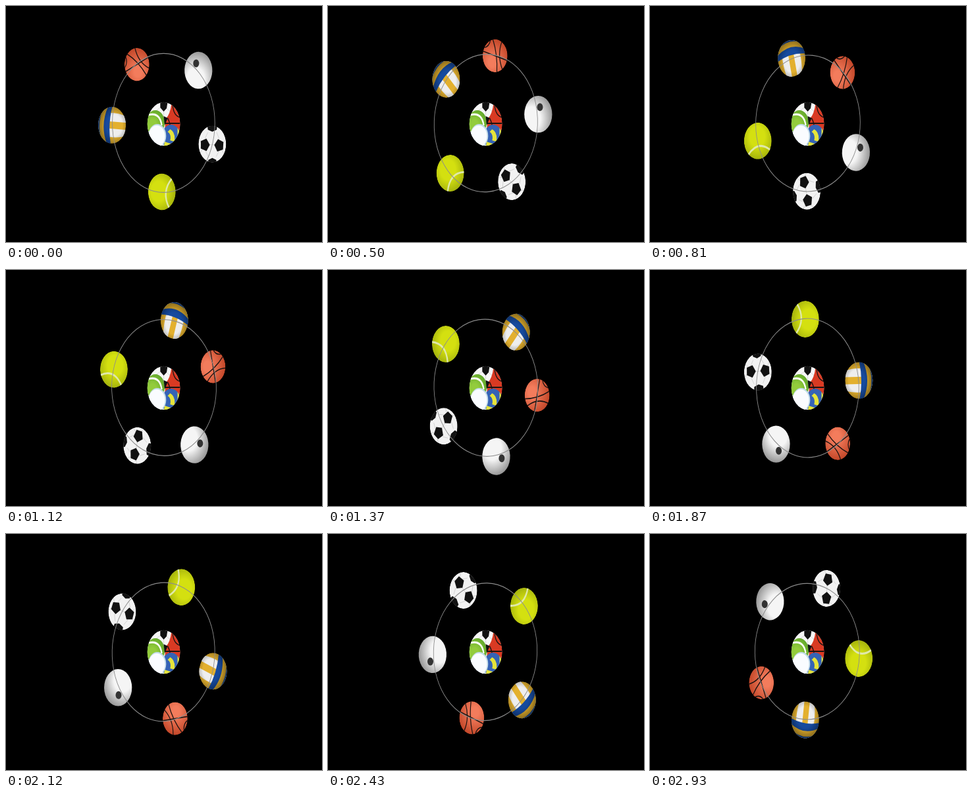
Write an HTML page that moves like this. It is 480 px wide and 360 px high and loops after 3000 ms.

```html
<!DOCTYPE html>
<html lang="en">
<head>
<meta charset="utf-8">
<title>Wheel of balls</title>
<style>
  html, body { margin: 0; width: 100%; height: 100%; overflow: hidden; background: #000; }
  svg { display: block; width: 480px; height: 360px; }
  .line { fill: none; stroke: #1c1412; stroke-width: 1.8; }
  .seam { fill: none; stroke: #c4c4c4; stroke-width: .7; }
  .ink { fill: #111; }
  .blue { fill: #164a9e; }
  .gold { fill: #e3b02e; }
</style>
</head>
<body>
<svg viewBox="0 0 480 360">
  <defs>
    <clipPath id="ball"><circle r="28"/></clipPath>
    <clipPath id="disc"><circle r="33.2"/></clipPath>
    <radialGradient id="shade" cx=".5" cy=".42" r=".58">
      <stop offset=".5" stop-opacity="0"/>
      <stop offset="1" stop-opacity=".4"/>
    </radialGradient>
    <radialGradient id="pearl" cx=".26" cy=".62" r=".8">
      <stop offset=".4" stop-color="#f5f5f5"/>
      <stop offset="1" stop-color="#8e8e8e"/>
    </radialGradient>
    <radialGradient id="felt" cx=".38" cy=".5" r=".68">
      <stop offset=".4" stop-color="#d4e010"/>
      <stop offset="1" stop-color="#9cab0c"/>
    </radialGradient>
    <radialGradient id="leather" cx=".3" cy=".4" r=".75">
      <stop offset=".2" stop-color="#f37c5c"/>
      <stop offset="1" stop-color="#c04426"/>
    </radialGradient>
    <radialGradient id="grass" cx=".35" cy=".6" r=".7">
      <stop offset=".3" stop-color="#93cc3c"/>
      <stop offset="1" stop-color="#5fa62a"/>
    </radialGradient>
    <path id="pent" class="ink" d="M0 -10L9.5 -3L6 8L-6 8L-9.5 -3Z"/>
  </defs>

  <g transform="translate(239.4 179.2) scale(.75 1)">
    <g id="wheel">
      <!-- white ball -->
      <g transform="rotate(-49) translate(107.5) rotate(7.5)">
        <circle r="28.2" fill="url(#pearl)"/>
        <circle cx="3.5" cy="-11" r="6" fill="#333"/>
      </g>

      <!-- soccer ball -->
      <g transform="rotate(17.7) translate(103.5) rotate(-17.7)" clip-path="url(#ball)">
        <circle r="28" fill="#f2f2f2"/>
        <path class="seam" d="M-7 1H6M-15 -8L-9 -18M14 -8L9 -18M-15 9L-8 19M14 10L8 19M-23 -2L-28 -9M22 -1L28 -8M-20 8L-25 15M19 9L25 16"/>
        <use href="#pent" transform="translate(-15 1) rotate(18)"/>
        <use href="#pent" transform="translate(14 2) rotate(-14)"/>
        <path class="ink" d="M-10 -30L-9 -22L0 -19L9 -22L10 -30ZM-9 30L-8 24L0 21L8 24L9 30Z"/>
      </g>

      <!-- tennis ball -->
      <g transform="rotate(91.9) translate(104.3) rotate(-85)" clip-path="url(#ball)">
        <circle r="28" fill="url(#felt)"/>
        <path d="M18 -23Q-2 0 18 23" fill="none" stroke="#e0e9aa" stroke-width="3"/>
      </g>

      <!-- volleyball -->
      <g transform="rotate(178.6) translate(104.4) rotate(-445)" clip-path="url(#ball)">
        <circle r="28" class="gold"/>
        <path fill="#eee" d="M-15 -28Q-20 -10 -18 10H-5.5V-28ZM15 -28Q20 -10 18 10H5.5V-28Z"/>
        <path class="blue" d="M-29 1Q0 9 29 1V30H-29Z"/>
        <path class="gold" d="M-29 9Q0 25 29 9V30H-29Z"/>
        <path class="blue" d="M-29 17Q0 34 29 17V30H-29Z"/>
        <circle r="28" fill="url(#shade)"/>
      </g>

      <!-- basketball -->
      <g transform="rotate(239) translate(105) rotate(-366.5) scale(.9)" clip-path="url(#ball)">
        <circle r="28" fill="url(#leather)"/>
        <path class="line" d="M6 -28Q0 0 -6 28M-28 6Q2 6 28 -7M-22 18Q2 4 26 14M12 -26Q14 -14 27 -12"/>
      </g>

      <ellipse cy="-.8" rx="103.8" ry="106" fill="none" stroke="#8c8c8c" stroke-width="1.15"/>
    </g>

    <!-- hub made of several balls -->
    <g transform="translate(.2 .8)" clip-path="url(#disc)">
      <circle r="33.5" fill="#f7f7f7"/>
      <path class="seam" d="M-7 -25L-16 -20M0 -19V-8M6 -24L14 -18"/>
      <path class="ink" d="M-7 -34H8L6 -24L0 -19L-7 -25Z"/>
      <circle cx="-17" cy="-2" r="19" fill="url(#grass)"/>
      <path d="M-30 -14Q-8 -18 -4 2" fill="none" stroke="#fff" stroke-width="3"/>
      <path d="M16 -32L36 -24V12L16 14L2 10L4 -8Q13 -14 16 -32Z" fill="#d93a23"/>
      <path class="line" d="M2 -1H34M8 -9Q16 3 12 14M18 -29Q20 -12 34 -10"/>
      <path class="ink" d="M0 -12L8 -9L2 2Z"/>
      <circle cx="15" cy="20" r="19" fill="#3563b6"/>
      <path fill="#e6e43a" d="M13 8Q24 12 22 27L13 25Q16 16 8 12ZM28 6L34 14L28 20ZM2 27L14 30L12 36H0Z"/>
      <circle cx="-13" cy="18" r="18" fill="#c3dcea"/>
      <circle cx="-14" cy="18.5" r="16.6" fill="#fafcff"/>
    </g>
  </g>
</svg>
<script>
  const LOOP = 3000, STEPS = 48;
  // [step, degrees turned]
  const turns = [[0, 0], [8, 41.5], [13, 73.3], [22, 127.5], [30, 175.5], [39, 226.5], [47, 274], [48, 280]];
  const wheel = document.getElementById('wheel');

  // Steps begin on whole hundredths of a second.
  function stepAt(ms) {
    const ticks = Math.floor(ms / 10) + 1;
    return Math.ceil(ticks * 10 * STEPS / LOOP) - 1;
  }

  function angleAt(step) {
    const i = turns.findIndex(([end]) => end > step);
    const [s0, a0] = turns[i - 1], [s1, a1] = turns[i];
    return a0 + (a1 - a0) * (step - s0) / (s1 - s0);
  }

  const start = performance.now();
  function draw() {
    const t = Math.max(0, performance.now() - start) % LOOP;
    wheel.setAttribute('transform', `rotate(${angleAt(stepAt(t))})`);
    requestAnimationFrame(draw);
  }
  draw();
</script>
</body>
</html>
```
